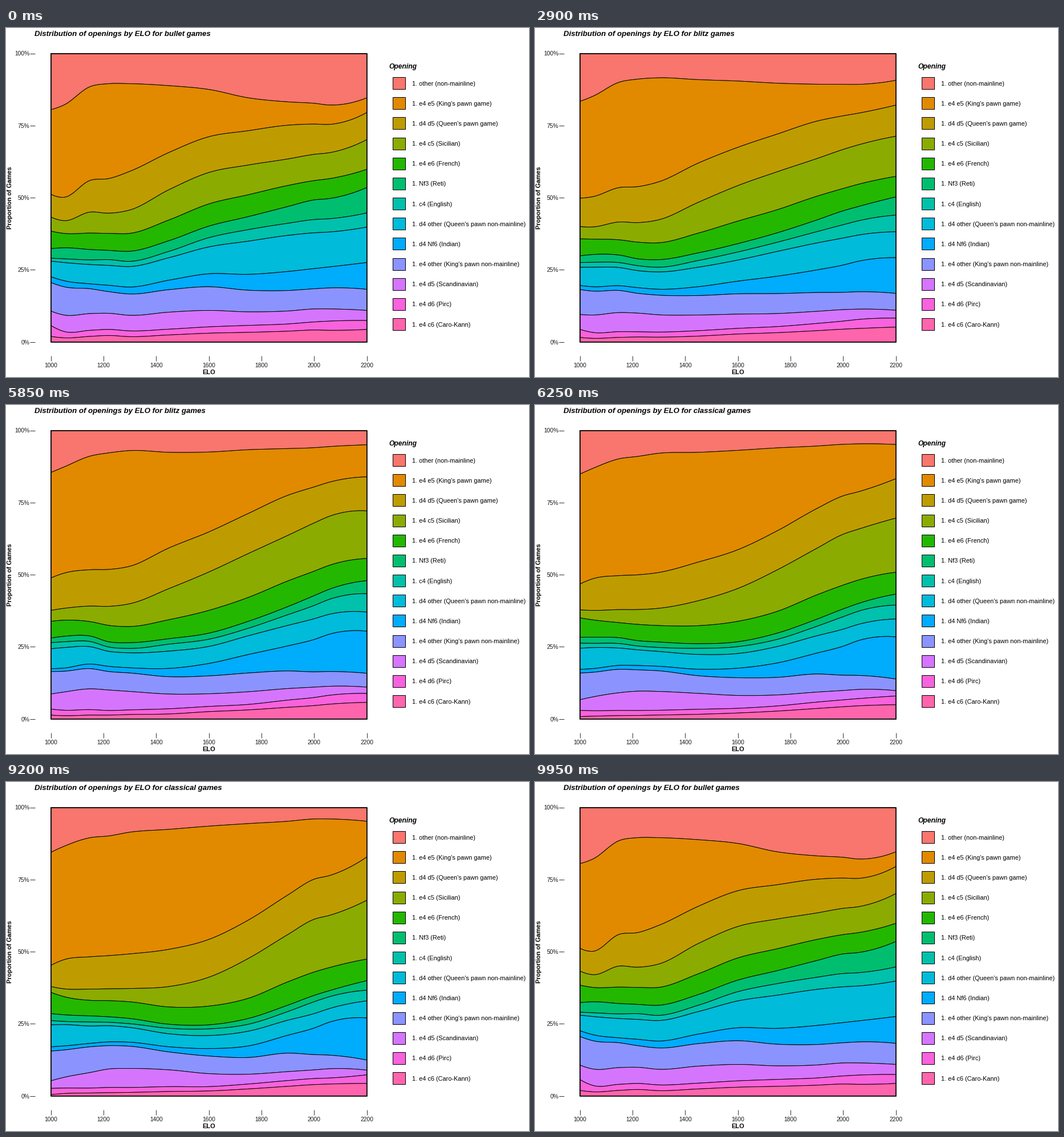
A matplotlib script that plays this animation: 917x611 px, repeating every 10 s.

```python
import numpy as np
import matplotlib.pyplot as plt
from matplotlib.animation import FuncAnimation
from matplotlib.patches import Polygon, Rectangle

W, H, DPI = 917, 611, 64
LEFT, RIGHT, TOP, BOTTOM = 78.5, 632.5, 44.5, 549.5
FRAMES, STEP = 200, 50

plt.rcParams["font.family"] = "Liberation Sans"

OPENINGS = [
    ("1. other (non-mainline)", "#F8766D"),
    ("1. e4 e5 (King's pawn game)", "#E18A00"),
    ("1. d4 d5 (Queen's pawn game)", "#BE9C00"),
    ("1. e4 c5 (Sicilian)", "#8CAB00"),
    ("1. e4 e6 (French)", "#24B700"),
    ("1. Nf3 (Reti)", "#00BE70"),
    ("1. c4 (English)", "#00C1AB"),
    ("1. d4 other (Queen's pawn non-mainline)", "#00BBDA"),
    ("1. d4 Nf6 (Indian)", "#00ACFC"),
    ("1. e4 other (King's pawn non-mainline)", "#8B93FF"),
    ("1. e4 d5 (Scandinavian)", "#D575FE"),
    ("1. e4 d6 (Pirc)", "#F962DD"),
    ("1. e4 c6 (Caro-Kann)", "#FF65AC"),
]

# Cumulative share (%) under each boundary, top to bottom, at these ratings
ELO = np.array([1000, 1050, 1150, 1220, 1300, 1450,
                1600, 1750, 1900, 2000, 2060, 2200])

BULLET = [
    [80.5, 82.1, 88.5, 89.5, 89.5, 88.8, 87.5, 84.6, 83.2, 82.7, 82.1, 84.6],
    [51.2, 50.1, 56.0, 56.6, 59.1, 65.7, 71.1, 73.2, 75.1, 75.5, 75.4, 79.5],
    [43.3, 42.0, 45.0, 44.6, 45.7, 52.8, 58.7, 61.3, 63.4, 65.0, 65.6, 70.1],
    [38.4, 37.6, 37.7, 37.6, 37.6, 42.3, 47.8, 51.0, 54.2, 55.9, 56.6, 59.8],
    [32.3, 32.6, 32.0, 31.7, 31.4, 35.1, 40.1, 43.4, 46.9, 49.2, 49.7, 53.5],
    [29.0, 28.8, 28.4, 28.5, 27.9, 31.4, 36.1, 38.9, 41.1, 42.4, 42.7, 44.7],
    [28.0, 27.5, 26.8, 26.5, 26.1, 29.2, 32.9, 34.9, 36.9, 37.8, 38.1, 39.8],
    [22.6, 21.2, 20.1, 19.6, 19.0, 21.4, 23.6, 23.4, 24.4, 25.4, 26.0, 27.5],
    [20.6, 19.1, 18.4, 17.4, 16.6, 18.1, 19.1, 17.9, 17.8, 18.4, 18.7, 18.2],
    [10.7, 9.3, 9.8, 9.9, 9.2, 10.3, 10.9, 10.4, 10.7, 11.4, 11.4, 10.9],
    [5.7, 3.6, 4.0, 4.3, 3.8, 4.4, 5.2, 5.7, 6.2, 6.9, 7.2, 7.4],
    [1.9, 1.4, 1.9, 2.2, 1.8, 2.4, 3.0, 3.3, 3.7, 4.1, 4.0, 4.3],
]
BLITZ = [
    [85.4, 87.3, 91.1, 92.2, 93.0, 92.4, 92.5, 93.3, 93.7, 94.0, 94.4, 95.0],
    [48.8, 50.5, 51.7, 51.8, 52.9, 59.3, 64.8, 71.2, 77.5, 80.4, 82.1, 83.9],
    [37.6, 38.3, 39.1, 39.0, 39.9, 45.2, 50.9, 57.3, 63.6, 67.9, 70.3, 72.1],
    [33.8, 34.2, 33.7, 32.4, 32.0, 34.4, 37.6, 42.1, 47.8, 51.2, 53.3, 55.6],
    [28.0, 28.6, 28.7, 26.7, 26.4, 27.8, 29.7, 33.8, 38.9, 42.7, 45.0, 47.9],
    [26.4, 26.7, 26.8, 24.9, 24.4, 25.9, 27.6, 31.4, 36.1, 39.3, 41.5, 43.4],
    [24.3, 24.7, 25.0, 23.4, 22.9, 23.5, 25.1, 28.8, 32.4, 34.7, 36.3, 37.0],
    [17.4, 17.6, 19.0, 18.2, 17.7, 17.5, 19.2, 22.3, 25.3, 27.5, 29.4, 30.4],
    [16.4, 16.5, 17.4, 16.4, 15.9, 14.6, 14.9, 15.9, 16.6, 16.3, 16.4, 15.8],
    [8.6, 9.3, 10.4, 10.0, 9.5, 8.6, 8.7, 9.4, 10.5, 11.0, 11.3, 11.0],
    [3.4, 3.0, 3.2, 2.9, 3.1, 3.5, 4.3, 5.0, 6.5, 7.4, 8.2, 8.8],
    [1.3, 1.1, 1.3, 1.3, 1.5, 1.7, 2.5, 3.1, 4.0, 4.6, 5.1, 5.7],
]
CLASSICAL = [
    [84.4, 86.5, 89.5, 90.1, 91.4, 92.4, 93.5, 94.4, 95.2, 96.0, 96.0, 95.2],
    [45.2, 47.2, 48.2, 48.6, 49.2, 50.8, 54.2, 60.9, 69.6, 75.1, 76.4, 82.8],
    [37.9, 37.1, 37.0, 37.1, 37.2, 37.9, 41.1, 47.6, 55.9, 61.2, 62.6, 67.8],
    [35.9, 34.4, 33.1, 33.0, 32.6, 30.8, 31.1, 33.8, 39.5, 42.9, 44.5, 47.4],
    [28.5, 28.1, 27.7, 27.4, 26.8, 24.8, 24.6, 26.8, 31.4, 34.8, 36.5, 39.9],
    [26.1, 25.8, 25.6, 25.5, 25.0, 23.4, 23.2, 24.8, 29.2, 32.6, 34.4, 36.6],
    [24.6, 24.7, 24.2, 24.3, 23.7, 21.5, 20.9, 22.4, 26.2, 28.5, 30.3, 32.9],
    [17.0, 17.3, 18.2, 18.7, 18.6, 17.0, 16.4, 17.3, 21.0, 23.5, 25.6, 27.0],
    [15.5, 15.9, 17.0, 17.4, 17.2, 15.2, 13.8, 13.3, 14.8, 14.3, 14.1, 12.4],
    [5.2, 6.4, 8.1, 9.3, 9.5, 9.0, 7.7, 7.5, 8.4, 9.0, 9.4, 8.9],
    [2.6, 2.7, 2.7, 2.9, 2.9, 3.2, 3.2, 4.1, 5.3, 6.0, 6.2, 7.3],
    [0.4, 0.8, 1.0, 1.1, 1.2, 1.5, 1.7, 2.4, 3.3, 3.9, 4.1, 4.3],
]

NAMES = ["bullet", "blitz", "classical"]
# (last still frame, number of steps) of each transition
MOVES = [(49, 17), (116, 17), (183, 16)]


def px(size):
    """Pixels to points."""
    return size * 72 / DPI


def x_pos(elo):
    return LEFT + (elo - 1000) / 1200 * (RIGHT - LEFT)


def y_pos(pct):
    return BOTTOM - pct / 100 * (BOTTOM - TOP)


def smooth(y, grid):
    """Cubic Hermite curve with parabolic tangents."""
    y = np.asarray(y)
    m = np.gradient(y, ELO, edge_order=2)
    i = np.clip(np.searchsorted(ELO, grid, side="right") - 1, 0, len(ELO) - 2)
    h = ELO[i + 1] - ELO[i]
    t = (grid - ELO[i]) / h
    return ((1 + 2 * t) * (1 - t) ** 2 * y[i] + t * (1 - t) ** 2 * h * m[i]
            + t * t * (3 - 2 * t) * y[i + 1] + t * t * (t - 1) * h * m[i + 1])


def layers(rows, grid):
    curves = [smooth(r, grid) for r in rows]
    return y_pos(np.array([0 * grid + 100, *curves, 0 * grid]))


def ease(p):
    return 4 * p ** 3 if p < 0.5 else 1 - 4 * (1 - p) ** 3


def pose(frame):
    """Start state, end state and progress at a frame."""
    for k, (start, steps) in enumerate(MOVES):
        if frame <= start:
            return k, k, 0.0
        if frame <= start + steps:
            return k, (k + 1) % 3, (frame - start) / steps
    return 0, 0, 0.0


grid = np.linspace(1000, 2200, 121)
xs = x_pos(grid)
states = [layers(rows, grid) for rows in (BULLET, BLITZ, CLASSICAL)]

fig = plt.figure(figsize=(W / DPI, H / DPI), dpi=DPI, facecolor="white")
ax = fig.add_axes([0, 0, 1, 1])
ax.set_xlim(0, W)
ax.set_ylim(H, 0)
ax.axis("off")


def label(x, y, text, size, **kw):
    kw.setdefault("va", "baseline")
    return ax.text(x, y, text, fontsize=px(size), **kw)


def tick(x, y):
    ax.plot(x, y, color="#333333", lw=px(1), solid_capstyle="butt")


bands = []
for k, (name, color) in enumerate(OPENINGS):
    band = Polygon([(0, 0), (1, 0), (1, 1)], fc=color, ec="black",
                   lw=px(0.95), joinstyle="round")
    bands.append(ax.add_patch(band))
    cy = 96 + 35.17 * k
    ax.add_patch(Rectangle((677.5, round(cy) - 10.5), 22, 21,
                           fc=color, ec="black", lw=px(1)))
    label(712, cy + 4.6, name, 11)

ax.add_patch(Rectangle((LEFT, TOP), RIGHT - LEFT, BOTTOM - TOP, fill=False,
                       ec="black", lw=px(1.6), zorder=3))

for pct in range(0, 101, 25):
    y = y_pos(pct)
    tick([42, 50.5], [y, y])
    label(41.5, y + 4, f"{pct}%", 10.2, ha="right", color="#1a1a1a")
for elo in range(1000, 2201, 200):
    x = x_pos(elo)
    tick([x, x], [574, 582.5])
    label(x, 594, elo, 10.2, ha="center", color="#1a1a1a")

label(355.5, 605.5, "ELO", 11, ha="center", weight="bold")
label(12.5, 297, "Proportion of Games", 11, rotation=90, ha="right",
      va="center", rotation_mode="default", weight="bold")
label(671, 71, "Opening", 12.1, weight="bold", style="italic")
title = label(50.5, 14, "", 13.25, weight="bold", style="italic")


def update(frame):
    a, b, p = pose(frame)
    ys = states[a] + (states[b] - states[a]) * ease(p)
    for k, band in enumerate(bands):
        band.set_xy(np.column_stack([np.r_[xs, xs[::-1]],
                                     np.r_[ys[k], ys[k + 1][::-1]]]))
    kind = NAMES[b if p >= 0.5 else a]
    title.set_text(f"Distribution of openings by ELO for {kind} games")
    return [*bands, title]


anim = FuncAnimation(fig, update, frames=FRAMES, interval=STEP,
                     repeat=True, repeat_delay=0)
plt.show()
```
